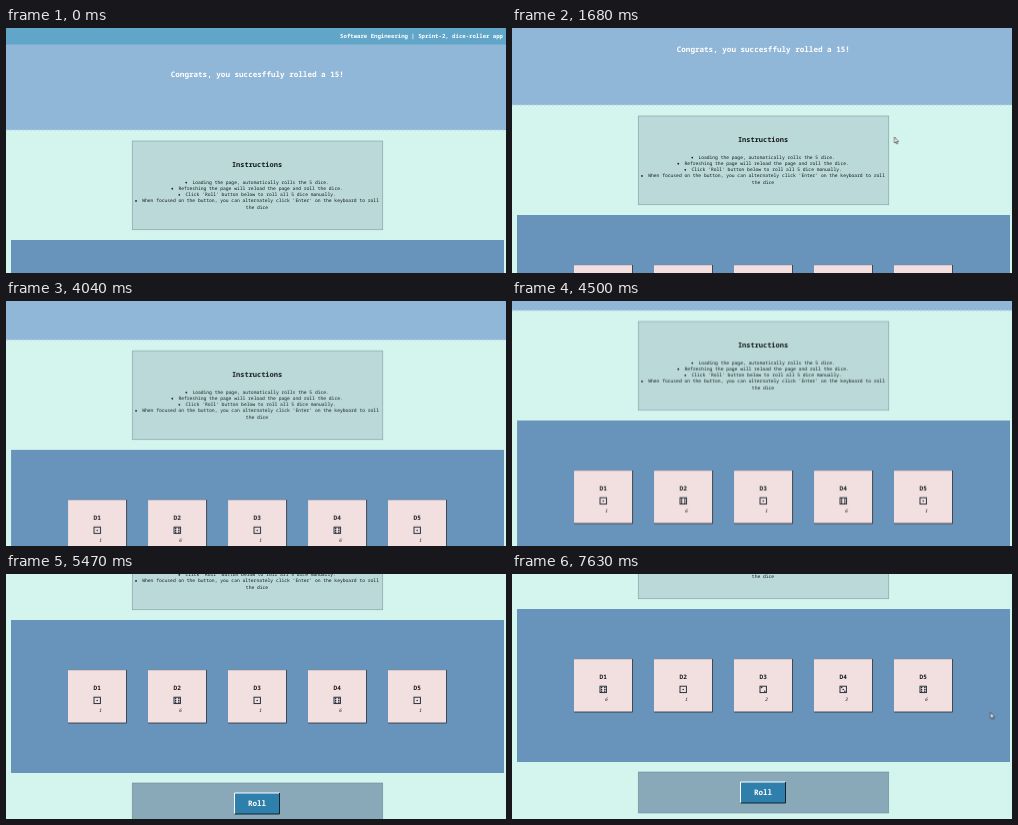
Animation, 500 px wide and 245 px high, one loop 8 s. Source, as an HTML page:

```html
<!DOCTYPE html>
<html lang="en">
<head>
<meta charset="utf-8">
<title>Dice roller</title>
<style>
  html, body { margin: 0; width: 100%; height: 100%; overflow: hidden; background: #d4f4ee; }
  svg { display: block; width: 500px; height: 245px; }
  text {
    font-family: "Noto Sans Mono", "DejaVu Sans Mono", monospace;
    font-size: 4.65px; fill: #14191c; text-anchor: middle; text-rendering: geometricPrecision;
  }
  .bold { font-weight: 700; }
  .white { fill: #fff; }
  .score { font-style: italic; }

  #page { animation: scroll 8s infinite; }
  #cursor { animation: point 8s infinite; }
  .roll { visibility: hidden; animation: 8s step-end infinite; }
  .roll0 { animation-name: roll0; }
  .roll1 { animation-name: roll1; }
  .roll2 { animation-name: roll2; }
  .roll3 { animation-name: roll3; }

  @keyframes scroll {
    0%, 6.49% { transform: translateY(0); animation-timing-function: steps(10, start); }
    16.09% { transform: translateY(-25px); }
    38.99% { transform: translateY(-25px); animation-timing-function: steps(11, start); }
    49.49% { transform: translateY(-50px); animation-timing-function: steps(6, start); }
    55.35% { transform: translateY(-89.5px); }
    56.24% { transform: translateY(-89.5px); animation-timing-function: steps(1, start); }
    57.25% { transform: translateY(-92.5px); animation-timing-function: steps(4, start); }
    61.25% { transform: translateY(-112px); }
    62.12% { transform: translateY(-112px); animation-timing-function: steps(7, start); }
    69.24% { transform: translateY(-166px); animation-timing-function: steps(2, start); }
    71.26%, 100% { transform: translateY(-177px); }
  }
  @keyframes point {
    0% { transform: translate(510px, 110px); animation-timing-function: step-end; }
    18.12% { transform: translate(510px, 110px); animation-timing-function: steps(4, start); }
    21.92% { transform: translate(382.5px, 109px); animation-timing-function: steps(3, start); }
    24.8% { transform: translate(379px, 112px); }
    27.87% { transform: translate(379px, 112px); animation-timing-function: steps(6, start); }
    33.84% { transform: translate(510px, 130px); animation-timing-function: step-end; }
    76.24% { transform: translate(458px, 166px); animation-timing-function: steps(6, start); }
    82.1% { transform: translate(458px, 138px); }
    82.99% { transform: translate(458px, 138px); animation-timing-function: steps(7, start); }
    89.85%, 100% { transform: translate(478.5px, 138.5px); }
  }
  @keyframes roll0 { 0% { visibility: visible; } 76.24%, 100% { visibility: hidden; } }
  @keyframes roll1 { 0% { visibility: hidden; } 76.24% { visibility: visible; } 82.99%, 100% { visibility: hidden; } }
  @keyframes roll2 { 0% { visibility: hidden; } 82.99% { visibility: visible; } 95.36%, 100% { visibility: hidden; } }
  @keyframes roll3 { 0% { visibility: hidden; } 95.36%, 100% { visibility: visible; } }
</style>
</head>
<body>
<svg viewBox="0 0 500 245">
  <rect width="500" height="245" fill="#d4f4ee"/>
  <g id="page">
    <rect y="16" width="500" height="86" fill="#90b6d8"/>
    <path d="M0 102H500" stroke="#b2d5e3" stroke-dasharray="2 2"/>
    <rect width="500" height="16.5" fill="#61a6c8"/>
    <text class="bold white" x="497" y="9.8" style="font-size:5.66px;text-anchor:end">Software Engineering | Sprint-2, dice-roller app</text>
    <text class="bold white" x="251.3" y="49.4" style="font-size:7.6px">Congrats, you succesffuly rolled a 15!</text>

    <rect x="126.25" y="113" width="250.5" height="88.75" fill="#bbd9d9" stroke="#809c9f" stroke-width=".6"/>
    <text class="bold" x="251" y="139.4" style="font-size:6.98px">Instructions</text>
    <g id="rules"></g>

    <rect x="5" y="212" width="493" height="153" fill="#6893bb"/>
    <g id="dice"></g>

    <rect x="126.25" y="375" width="250.5" height="41" fill="#89a8b8" stroke="#6f8d9b" stroke-width=".6"/>
    <rect x="228.5" y="385" width="45" height="21" fill="#2e7fab"/>
    <path d="M228.5 406V385H273.5" fill="none" stroke="#fff"/>
    <path d="M228.5 406H273.5V385" fill="none" stroke="#13242f"/>
    <text class="bold white" x="251" y="398" style="font-size:7.6px">Roll</text>
  </g>
  <path id="cursor" d="M0 0V6L1.4 4.9L2.3 7L3.2 6.6L2.3 4.5H4Z" fill="#fff" stroke="#222" stroke-width=".6"/>
</svg>
<script>
  const rules = [
    "Loading the page, automatically rolls the 5 dice.",
    "Refreshing the page will reload the page and roll the dice.",
    "Click 'Roll' button below to roll all 5 dice manually.",
    "When focused on the button, you can alternately click 'Enter' on the keyboard to roll",
    "the dice"
  ];
  const rolls = [[1, 6, 1, 6, 1], [3, 2, 5, 1, 4], [2, 4, 6, 3, 1], [6, 1, 2, 3, 6]];
  // Pip positions on a grid from -1 to 1.
  const diagonal = [[-1, -1], [1, 1]];
  const corners = [...diagonal, [1, -1], [-1, 1]];
  const pips = {
    1: [[0, 0]], 2: diagonal, 3: [...diagonal, [0, 0]], 4: corners,
    5: [...corners, [0, 0]], 6: [...corners, [-1, 0], [1, 0]]
  };

  const center = i => 91.2 + 80 * i;

  const rule = (line, i) => {
    const y = 156.1 + 6.1 * i;
    if (i === 4) return `<text x="251" y="${y}">${line}</text>`;
    const left = 254.6 - line.length * 1.395 - 6;
    return `<circle cx="${left}" cy="${y - 1.5}" r=".85" fill="#14191c"/>
      <text x="254.6" y="${y}">${line}</text>`;
  };

  const card = i => {
    const x = center(i) - 29.2;
    return `<rect x="${x}" y="262" width="58.5" height="53" fill="#f2dfe0"/>
      <path d="M${x} 262H${x + 58.5}" stroke="#8b8187" stroke-width=".5"/>
      <path d="M${x} 315H${x + 58.5}V262" fill="none" stroke="#262b33" stroke-width=".8"/>
      <text class="bold" x="${center(i)}" y="282" style="font-size:6.1px">D${i + 1}</text>`;
  };

  const face = (value, i) => {
    const x = center(i), y = 292.4;
    const dots = pips[value].map(([dx, dy]) =>
      `<circle cx="${x + dx * 1.6}" cy="${y + dy * 1.8}" r=".75" fill="#14232e"/>`).join("");
    return `<rect x="${x - 3.2}" y="${y - 3.2}" width="6.4" height="6.4" fill="#f2dfe0" stroke="#14232e" stroke-width=".9"/>
      ${dots}<text class="score" x="${x + 2.9}" y="303.7">${value}</text>`;
  };

  document.getElementById("rules").innerHTML = rules.map(rule).join("");
  document.getElementById("dice").innerHTML =
    rolls[0].map((_, i) => card(i)).join("") +
    rolls.map((values, n) => `<g class="roll roll${n}">${values.map(face).join("")}</g>`).join("");
</script>
</body>
</html>
```
